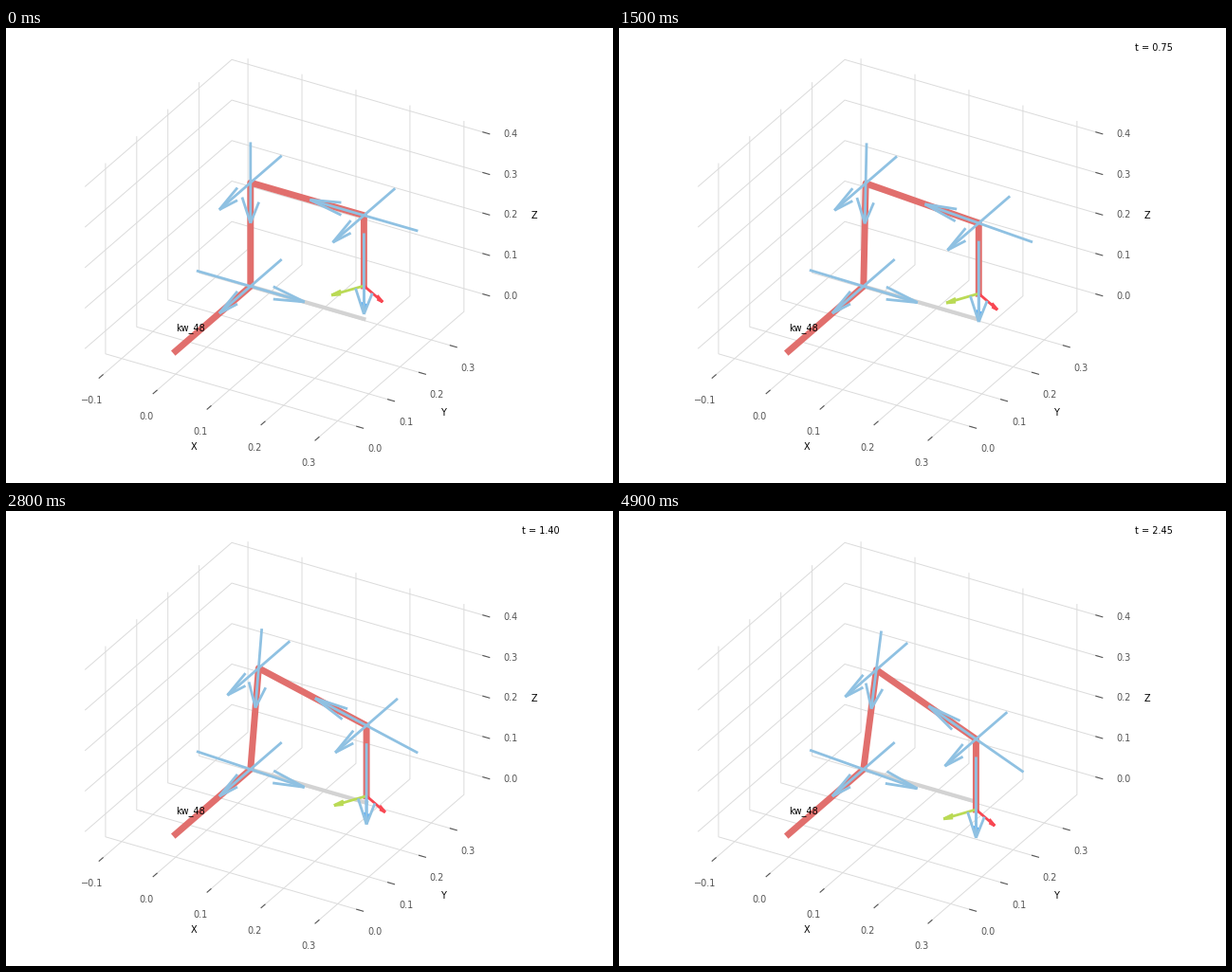
Write a matplotlib script that moves like this. It is 640 by 480 pixels and loops after 5 s.

```python
import numpy as np
import matplotlib.pyplot as plt
from matplotlib.animation import FuncAnimation

W, H, DPI = 640, 480, 100
FRAMES, INTERVAL = 50, 100
plt.rcParams["font.family"] = "DejaVu Sans"
plt.rcParams["font.size"] = 7

# Orthographic view, elevation 30, azimuth -60, with z drawn at 3/4 scale
SCALE = 657.6
ORIGIN = np.array([178.9, 340.83])
AXES = SCALE * np.array([[0.8660, 0.25], [0.5, -0.4330], [0, -0.6495]])

# Equal ranges around the middle of the robot and its joint arrows
HALF = 0.41 * 1.1 * 25 / 24 / 2
X_LIM, Y_LIM, Z_LIM = [(mid - HALF, mid + HALF) for mid in (0.105, 0.17, 0.178)]

LINK, JOINT, SHADOW = "#E16F6D", "#8FC1E2", "lightgrey"
EE_X, EE_Y, EE_Z = "#F84752", "#BADA55", "#54AEFF"
GRID, TICK = "#dbdbdb", "#555555"

SHOULDER, UPPER, FORE, WRIST, TOOL = 0.24, 0.256, 0.21, 0.144, 0.030
UPPER_TURN, FORE_TURN = 0.0927, 0.497
JOINT_LEN, EE_LEN = 0.2, 0.06
DOWN, TO_FRONT = np.array([0, 0, -1.0]), np.array([0, -1.0, 0])

fig = plt.figure(figsize=(W / DPI, H / DPI), dpi=DPI, facecolor="white")
ax = fig.add_axes([0, 0, 1, 1])
ax.set_xlim(0, W)
ax.set_ylim(H, 0)
ax.axis("off")


def project(points):
    return ORIGIN + np.asarray(points, float) @ AXES


def polyline(points, color, width, z=1):
    return ax.plot(*project(points).T, color=color, lw=width, zorder=z)[0]


def label(x, y, text, color="black", ha="center"):
    return ax.text(x, y, text, color=color, ha=ha, va="baseline", zorder=5)


def tick(edge, outward, text, offset):
    outward = np.array(outward)
    edge = np.array(edge)
    polyline([edge - 0.0048 * outward, edge + 0.0073 * outward], TICK, 0.8)
    x, y = project(edge) + offset
    label(x, y + 3.5, text, TICK)


def draw_box():
    (x0, x1), (y0, y1), (z0, z1) = X_LIM, Y_LIM, Z_LIM
    for i in range(-1, 4):
        v = i / 10
        polyline([(v, y0, z0), (v, y1, z0), (v, y1, z1)], GRID, 0.7, 0)
        tick((v, y0, z0), (0, -1, 0), f"{v:.1f}".replace("-", "\u2212"), (-9.5, 25.6))
    for i in range(4):
        v = i / 10
        polyline([(x1, v, z0), (x0, v, z0), (x0, v, z1)], GRID, 0.7, 0)
        tick((x1, v, z0), (1, 0, 0), f"{v:.1f}", (16.3, 22.5))
    for i in range(5):
        v = i / 10
        polyline([(x1, y1, v), (x0, y1, v), (x0, y0, v)], GRID, 0.7, 0)
        tick((x1, y1, v), (1, 0, 0), f"{v:.1f}", (26, 0.9))
    label(198, 445, "X")
    label(461.2, 409, "Y")
    label(557.2, 201, "Z")
    label(*project((0, 0, 0.05)), "kw_48", ha="left")


def arrow_parts(tail, vector):
    """Shaft and two barbs, each barb turned 15 degrees in the vertical plane."""
    tip = tail + vector
    flat = np.hypot(vector[0], vector[1])
    axis = np.array([vector[1], -vector[0], 0]) / flat if flat > 1e-9 else np.array([0, 1.0, 0])
    side = np.cross(axis, vector)
    c, s = np.cos(np.radians(15)), np.sin(np.radians(15))
    return [(tail, tip)] + [(tip, tip - 0.3 * (c * vector + k * s * side)) for k in (1, -1)]


class Arrow:
    def __init__(self, color, z):
        self.lines = [ax.plot([], [], color=color, lw=2, zorder=z, snap=False,
                              solid_capstyle="butt")[0] for _ in range(3)]

    def place(self, tail, vector):
        for line, part in zip(self.lines, arrow_parts(tail, vector)):
            line.set_data(*project(part).T)


def pose(u):
    """Joint positions and link directions at blend u of the motion."""
    a, b = UPPER_TURN * u, FORE_TURN * u
    up = np.array([np.sin(a), 0, np.cos(a)])
    out = np.array([np.cos(b), 0, -np.sin(b)])
    across = np.array([np.cos(a), 0, -np.sin(a)])
    shoulder = np.array([0, SHOULDER, 0])
    elbow = shoulder + UPPER * up
    wrist = elbow + FORE * out
    flange = wrist + WRIST * DOWN
    end = flange + TOOL * DOWN
    joints = [(shoulder, TO_FRONT), (shoulder, across), (elbow, TO_FRONT), (elbow, -up),
              (wrist, TO_FRONT), (wrist, -out), (flange, DOWN)]
    return np.array([np.zeros(3), shoulder, elbow, wrist, flange, end]), joints


draw_box()
shadow = polyline(np.zeros((2, 3)), SHADOW, 3, 2)
arm = polyline(np.zeros((2, 3)), LINK, 5, 3)
C30, S30 = np.cos(np.pi / 6), np.sin(np.pi / 6)
tool_axes = [(Arrow(EE_Z, 6), DOWN),
             (Arrow(EE_Y, 7), np.array([-S30, -C30, 0])),
             (Arrow(EE_X, 8), np.array([C30, -S30, 0]))]
joint_arrows = [Arrow(JOINT, 9) for _ in range(7)]
timer = label(544, 24, "", ha="left")


def update(k):
    t = k / (FRAMES - 1)
    points, joints = pose(t**3 * (10 - 15 * t + 6 * t * t))
    arm.set_data(*project(points).T)
    shadow.set_data(*project(points * [1, 1, 0]).T)
    for arrow, (centre, axis) in zip(joint_arrows, joints):
        arrow.place(centre - JOINT_LEN / 2 * axis, JOINT_LEN * axis)
    for arrow, axis in tool_axes:
        arrow.place(points[-1], EE_LEN * axis)
    timer.set_text(f"t = {k * 0.05:.2f}" if k else "")
    return []


anim = FuncAnimation(fig, update, frames=FRAMES, interval=INTERVAL,
                     init_func=lambda: update(0), repeat=True, repeat_delay=0)
plt.show()
```
